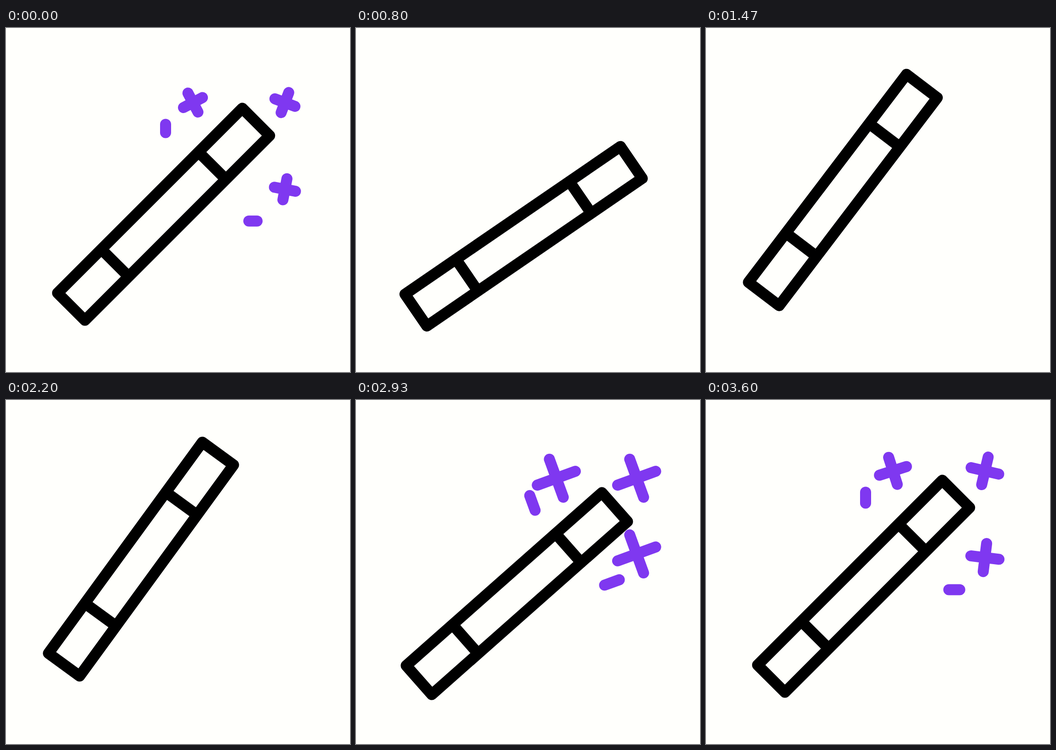
Write an HTML page that moves like this. It is 748 px wide and 748 px high and loops after 3670 ms.

```html
<!DOCTYPE html>
<html lang="en">
<head>
<meta charset="utf-8">
<title>Magic wand</title>
<style>
  html, body { margin: 0; width: 100%; height: 100%; overflow: hidden; background: #fffffc; }
  svg { display: block; width: 100vw; height: 100vh; }
  path { fill: none; stroke-width: 24; stroke-linecap: round; stroke-linejoin: round; }
  #wand { stroke: #000; }
  #sparkles { stroke: #7f38f0; }
</style>
</head>
<body>
<svg viewBox="0 0 748 748">
  <path id="wand" d="M-284 -42H284V42H-284ZM-149.5 -42V42M149.5 -42V42"/>
  <g id="sparkles"></g>
</svg>
<script>
const LOOP = 3670, HOLD = 600, STEP = 200 / 3, STEPS = 47;
const ORIGIN = { x: 636, y: 377.5 };

// step, centre x, centre y, angle
const poses = [
  [0, 342.7, 405.1, 45],
  [5, 367, 458.4, 33.2],
  [15.5, 293.5, 346, 53.9],
  [25, 293.5, 346, 53.9],
  [31, 380.75, 490.3, 26],
  [37.9, 342.7, 405.1, 45],
  [STEPS, 342.7, 405.1, 45]
];

// resting place, half arm lengths, then drift and turn while vanishing
const sparkles = [
  { x: 406.5, y: 140, w: 44, h: 44, dx: 0, dy: 47, turn: -59 },
  { x: 606.5, y: 140, w: 44, h: 44, dx: 0, dy: 47, turn: 44 },
  { x: 606.5, y: 328.5, w: 44, h: 44, dx: 0, dy: 47, turn: 23 },
  { x: 347, y: 201.5, w: 0, h: 17, dx: 0, dy: 36, turn: 0 },
  { x: 545, y: 399.5, w: 17, h: 0, dx: -17, dy: 43, turn: 0 }
];

const wand = document.getElementById("wand");
const group = document.getElementById("sparkles");
for (const s of sparkles) {
  s.path = document.createElementNS("http://www.w3.org/2000/svg", "path");
  group.append(s.path);
}

const progress = (k, from, to) => Math.min(1, Math.max(0, (k - from) / (to - from)));
const smooth = x => x * x * (3 - 2 * x);
const mix = (a, b, x) => a + (b - a) * x;

function place(el, x, y, angle) {
  el.setAttribute("transform", `translate(${x} ${y}) rotate(${angle})`);
}

function drawWand(k) {
  const i = poses.findIndex(p => p[0] > k);
  const a = poses[i - 1], b = poses[i];
  const e = smooth(progress(k, a[0], b[0]));
  const [, x, y, angle] = a.map((v, n) => mix(v, b[n], e));
  place(wand, x, y, -angle);
}

function drawSparkles(k) {
  if (k < 6) k += STEPS;
  const spread = 1 - (1 - progress(k, 30.35, 41.7)) ** 3;
  const grow = progress(k, 30.2, 35);
  const out = progress(k, 42.9, 51);
  const fall = 0.85 * smooth(out) + 0.15 * out * out;
  const size = grow * (1 - fall);
  group.style.display = spread > 0 && fall < 1 ? "" : "none";
  for (const s of sparkles) {
    const w = s.w * size, h = s.h * size;
    const across = s.w ? `M${-w} 0H${w}` : "";
    const down = s.h ? `M0 ${-h}V${h}` : "";
    s.path.setAttribute("d", across + down);
    place(s.path,
      mix(ORIGIN.x, s.x, spread) + s.dx * fall,
      mix(ORIGIN.y, s.y, spread) + s.dy * fall,
      -158 * (1 - spread) + s.turn * fall);
  }
}

const start = performance.now();
function draw() {
  const t = (performance.now() - start) % LOOP;
  // motion is held at 15 steps a second after the opening pause
  const k = t < HOLD ? 0 : Math.min(STEPS - 1, Math.floor((t - HOLD + 4) / STEP) + 1);
  drawWand(k);
  drawSparkles(k);
  requestAnimationFrame(draw);
}
draw();
</script>
</body>
</html>
```
